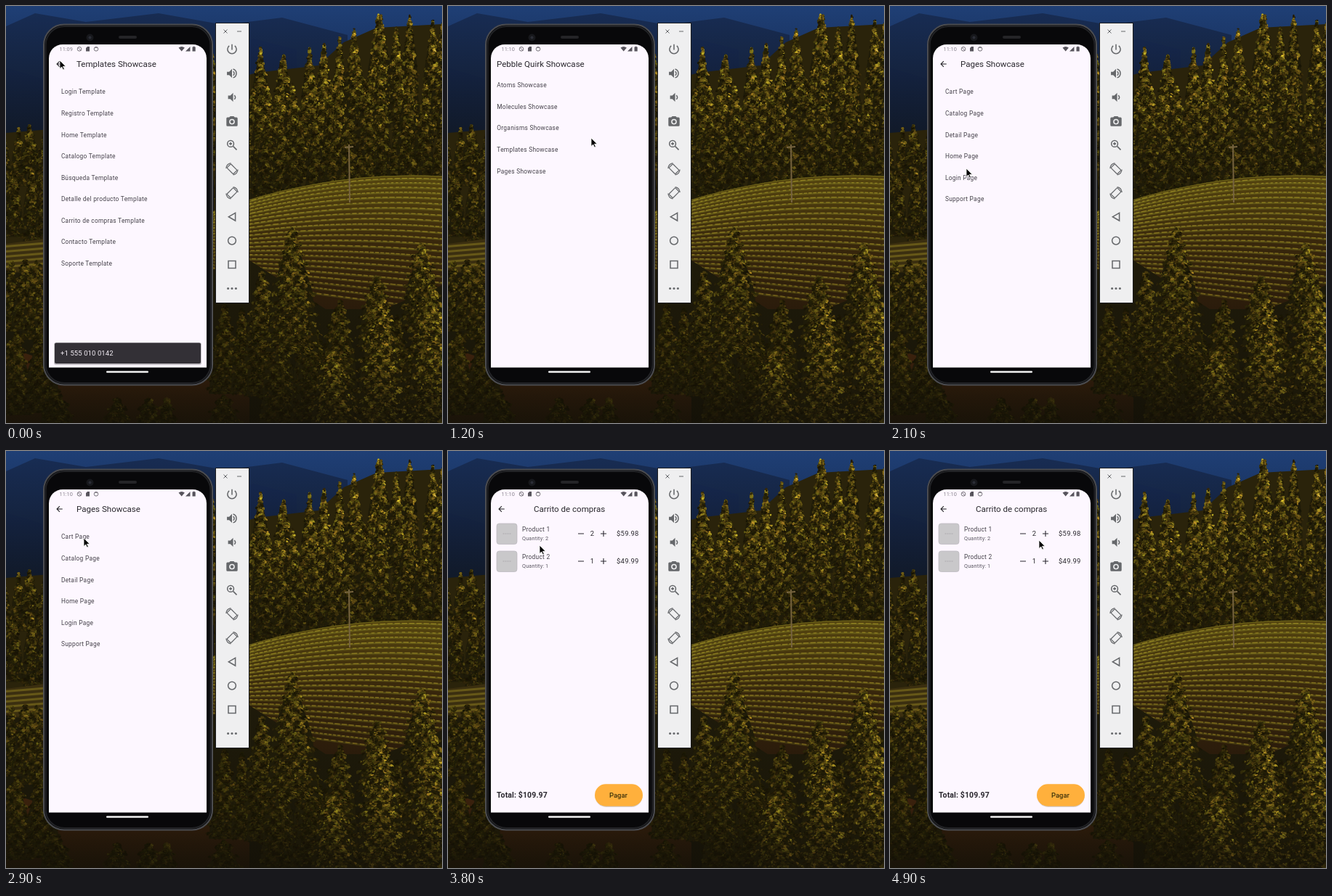
Recreate the animation shown at these times as an HTML page with a canvas. Size 600 px wide and 575 px high, loop 5000 ms.

```html
<!DOCTYPE html>
<html lang="es">
<head>
<meta charset="utf-8">
<title>Showcase demo</title>
<style>
html, body { margin: 0; width: 100%; height: 100%; overflow: hidden; background: #111; }
canvas, svg { position: absolute; left: 0; top: 0; display: block; }
text { font-family: Roboto, sans-serif; fill: #2a282e; white-space: pre; }
.title { font-size: 11.55px; }
.item { font-size: 8.4px; letter-spacing: .2625px; fill: #45424a; }
.sub { font-size: 7.35px; letter-spacing: .13px; fill: #5c5862; }
.price { font-size: 9.45px; letter-spacing: .26px; }
.total { font-size: 10.5px; letter-spacing: .13px; font-weight: 700; }
.toast { font-size: 9.45px; letter-spacing: .13px; fill: #f5eff7; }
.pay { font-size: 9.45px; font-weight: 500; fill: #40340c; }
.clock { font-size: 7.35px; fill: #85818a; }
.line { fill: none; stroke: #66686b; stroke-width: 2; }
.solid { fill: #66686b; }
</style>
</head>
<body>
<canvas id="scenery" width="600" height="575"></canvas>
<svg id="stage" width="600" height="575" viewBox="0 0 600 575"></svg>
<script>
// ---------- landscape ----------
const ctx = document.getElementById('scenery').getContext('2d');
let seed = 11;
const rand = () => (seed = (seed * 16807) % 2147483647) / 2147483647;
const between = (a, b) => a + (b - a) * rand();

function shape(color, ...points) {
  ctx.fillStyle = color;
  ctx.beginPath();
  points.forEach(([x, y]) => ctx.lineTo(x, y));
  ctx.fill();
}

function fade(y0, y1, ...colors) {
  const g = ctx.createLinearGradient(0, y0, 0, y1);
  colors.forEach((c, i) => g.addColorStop(i / (colors.length - 1), c));
  return g;
}

// Leaf dabs over a dark silhouette, with lit clumps; a lower taper makes a rounder crown
function tree(x, top, base, width, light, taper = .75) {
  const h = base - top;
  shape('#1f1b09', [x, top], [x + width * .3, top + h * .5], [x + width * .4, base],
    [x - width * .4, base], [x - width * .3, top + h * .5]);
  for (let i = h * width / 7; i > 0; i--) {
    const u = rand() ** .8, side = between(-1, 1);
    const reach = width / 2 * u ** taper * (.75 + .25 * Math.sin(u * h * .45 + x));
    const px = x + side * reach, py = top + u * h;
    const clump = .55 + .45 * Math.sin(px * .34 + x) * Math.sin(py * .3 + x);
    const lum = 5 + light * rand() * clump * (1 + side * .25) * (1.2 - u * .6);
    ctx.fillStyle = `hsl(${between(41, 55)} 66% ${lum}%)`;
    ctx.beginPath();
    ctx.ellipse(px, py, between(.8, 2.6), between(.7, 1.7), side * .6, 0, 7);
    ctx.fill();
  }
}

function forest(x0, x1, count, topAt, height, width, light, taper) {
  for (let i = 0; i < count; i++) {
    const x = x0 + (x1 - x0) * (i + rand()) / count, top = topAt(x) + between(-13, 13);
    tree(x, top, top + height * between(.8, 1.2), width * between(.75, 1.25), light, taper);
  }
}

function vineyard() {
  ctx.save();
  ctx.beginPath();
  ctx.moveTo(280, 285);
  ctx.quadraticCurveTo(450, 222, 620, 236);
  ctx.lineTo(620, 460);
  ctx.lineTo(280, 400);
  ctx.clip();
  ctx.fillStyle = fade(235, 420, '#54440f', '#38270c', '#2a1b0b');
  ctx.fillRect(280, 220, 340, 250);
  for (let k = 0; k < 24; k++) {
    const s = (k / 23) ** 1.15;
    for (const [shift, lum, weight] of [[0, 25, 2.4], [-.8, 36, 1.2]]) {
      ctx.strokeStyle = `hsl(${52 - s * 5} 62% ${lum - s * 9}%)`;
      ctx.lineWidth = weight + s * .6;
      ctx.setLineDash(shift ? [between(3, 8), between(2, 4)] : []);
      ctx.beginPath();
      ctx.moveTo(280, 285 + s * 90 + shift);
      ctx.quadraticCurveTo(450, 222 + s * 180 + shift, 620, 236 + s * 185 + shift);
      ctx.stroke();
    }
  }
  ctx.restore();
}

function landscape() {
  shape(fade(0, 200, '#1f3f75', '#172e58', '#131f36'), [0, 0], [600, 0], [600, 575], [0, 575]);
  shape(fade(0, 170, '#182d55', '#121b2c'), [0, 28], [40, 10], [110, 22], [210, 10], [300, 26],
    [380, 16], [470, 40], [470, 200], [0, 200]);
  shape(fade(50, 170, '#15264a', '#111a2a'), [0, 85], [50, 100], [280, 75], [340, 45], [400, 60],
    [400, 200], [0, 200]);

  // Hillside forest, back to front
  shape('#2a230b', [280, 110], [345, 92], [430, 82], [465, 50], [510, 30], [600, 25], [600, 575], [0, 575],
    [0, 175], [60, 170]);
  const skyline = x => 24 + 52 / (1 + Math.exp((x - 455) / 18));
  forest(284, 610, 17, x => skyline(x) - 8, 125, 38, 44);
  forest(284, 610, 17, x => skyline(x) + 38, 115, 40, 42);
  forest(284, 610, 17, x => skyline(x) * .4 + 90, 100, 38, 34);
  forest(284, 610, 18, () => 152, 95, 36, 27);
  forest(284, 610, 18, () => 196, 75, 34, 21);
  forest(-5, 62, 4, () => 172, 80, 32, 32);
  forest(-5, 62, 5, () => 230, 95, 34, 28);
  vineyard();

  shape('#3b2f10', [0, 328], [60, 320], [60, 362], [0, 368]);
  for (let y = 330; y < 364; y += 7) shape('#665818', [0, y], [60, y - 5], [60, y - 2], [0, y + 3]);

  shape('#75623f', [471, 191], [473, 191], [474, 271], [472, 271]);
  shape('#75623f', [466, 194], [478, 193], [478, 195], [466, 196]);

  // Foreground: shaded slope with bare soil, then the sunlit crowns
  shape(fade(360, 575, '#1e1a0a', '#171408'), [0, 368], [280, 365], [334, 350], [440, 418], [520, 418],
    [600, 385], [600, 575], [0, 575]);
  forest(-5, 60, 4, () => 362, 110, 46, 28, .5);
  shape(fade(480, 575, '#3a210d', '#22170a'), [0, 470], [60, 490], [260, 495], [335, 540], [335, 575], [0, 575]);
  forest(-10, 60, 3, () => 450, 110, 56, 18, .5);
  forest(40, 340, 5, () => 540, 70, 60, 13, .5);
  forest(285, 350, 3, () => 405, 140, 50, 18, .6);
  forest(340, 600, 7, () => 430, 140, 64, 18, .6);
  tree(352, 365, 490, 60, 27, .6);
  tree(572, 328, 450, 70, 38, .5);
  tree(394, 306, 480, 92, 34, .6);
  tree(510, 372, 470, 64, 32, .5);
  tree(460, 405, 560, 66, 24, .6);
  tree(515, 400, 590, 88, 40, .5);
  tree(586, 385, 590, 90, 42, .5);
  tree(450, 475, 600, 84, 34, .5);
  shape(fade(490, 575, '#120f0700', '#120f0788'), [0, 490], [600, 490], [600, 575], [0, 575]);
}
landscape();

// ---------- phone and emulator panel ----------
const text = (cls, x, y, s, extra = '') => `<text class="${cls}" x="${x}" y="${y}" ${extra}>${s}</text>`;
const rect = (x, y, w, h, fill, extra = '') =>
  `<rect x="${x}" y="${y}" width="${w}" height="${h}" fill="${fill}" ${extra}/>`;
const line = (d, extra = '') => `<path class="line" d="${d}" ${extra}/>`;
const solid = d => `<path class="solid" d="${d}"/>`;
const group = (id, content) => `<g id="${id}">${content}</g>`;
const icon = (x, y, scale, content) =>
  `<g transform="translate(${x} ${y}) scale(${scale}) translate(-12 -12)">${content}</g>`;
const rows = (x, y, names) => names.map((s, i) => text('item', x, y + i * 29.55, s)).join('');

const speaker = x => solid(`M${x} 9v6h4l5 5V4l-5 5z`);
const device = '<rect class="line" x="7" y="4" width="10" height="16" rx="1" transform="rotate(-45 12 12)" style="stroke-width:1.6"/>' +
  line('M1.500 11A10.500 10.500 0 0 1 10 1.500M22.500 13A10.500 10.500 0 0 1 14 22.500', 'style="stroke-width:1.600"');
const panelIcons = [
  line('M12 2.5v10M7 5.3a8 8 0 1 0 10 0'),
  speaker(3) + line('M14 8.5a4 4 0 0 1 0 7M14 4.3a8 8 0 0 1 0 15.4'),
  speaker(5) + line('M16 8.5a4 4 0 0 1 0 7'),
  solid('M4 5h3l2-2h6l2 2h3a2 2 0 0 1 2 2v12a2 2 0 0 1-2 2H4a2 2 0 0 1-2-2V7a2 2 0 0 1 2-2z') +
    '<circle cx="12" cy="13" r="4" fill="#66686b" stroke="#efeff0" stroke-width="2"/>',
  '<circle class="line" cx="9.5" cy="9.5" r="5.7"/>' + line('M14 14l6.5 6.5M9.5 7v5M7 9.5h5'),
  device,
  `<g transform="matrix(-1 0 0 1 24 0)">${device}</g>`,
  line('M18 5v14L6 12z'),
  '<circle class="line" cx="12" cy="12" r="7"/>',
  line('M5.5 5.5h13v13h-13z'),
  '<g class="solid"><circle cx="5" cy="12" r="2"/><circle cx="12" cy="12" r="2"/><circle cx="19" cy="12" r="2"/></g>'
];
const panel = rect(288.5, 23.5, 46, 386, '#efeff0', 'stroke="#1b1c1e"') +
  line('M299.5 32.5l5 5m0-5l-5 5M318 35h6', 'style="stroke-width:1"') +
  panelIcons.map((s, i) => icon(311, 60 + i * 32.95, .77, s)).join('');

const phone = rect(283, 240, 3, 42, '#151517', 'rx="1"') +
  rect(52, 25.5, 232, 497, '#08080a', 'rx="28" stroke="#4b4c50" stroke-width="2"') +
  rect(54.5, 28, 227, 492, 'none', 'rx="26" stroke="#222326" stroke-width="2"') +
  '<circle cx="115.5" cy="43.5" r="5" fill="#17181c"/><circle cx="115.5" cy="43.5" r="2" fill="#2b2d36"/>' +
  rect(155, 41, 25, 4, '#242427', 'rx="2"') +
  '<path fill="#fdf7ff" d="M59 498.400V72a19 19 0 0 1 19-19h179a19 19 0 0 1 19 19v426.400z"/>' +
  rect(138, 503.3, 58, 2.5, '#f2f2f2', 'rx="1.2"');

const status = text('clock', 73.5, 62.3, '', 'id="clock"') +
  '<g fill="none" stroke="#77737b"><circle cx="101" cy="59.3" r="2.8"/><path d="M99 57.3l4 4"/>' +
  '<circle cx="124" cy="59.3" r="2.8"/><path d="M122 57.3h4"/></g>' +
  '<g fill="#57545c"><path d="M110 58l2-2h3v6.5h-5z"/><path d="M237.5 57.5q4.2-3 8.4 0l-4.2 5z"/>' +
  '<path d="M253.5 56v6.5h-6.5z"/><path d="M256.5 56.5h1.2v-.8h1.8v.8h1.2v6h-4.2z"/></g>';

const backArrow = icon(73.5, 80, .525,
  '<path fill="#1d1b20" d="M20 11H7.8l5.6-5.6L12 4l-8 8 8 8 1.4-1.4L7.8 13H20z"/>');

const product = (n, y, quantity, price) =>
  rect(67, y - 14, 28, 28.5, '#c9c8ca', 'rx="3.5" stroke="#b9b7bc" stroke-width=".7"') +
  line(`M75.5 ${y}h11`, 'style="stroke:#aaa8ad;stroke-width:1;stroke-dasharray:2 1"') +
  text('item', 102, y - 3, 'Product ' + n) +
  text('sub', 102, y + 9, 'Quantity: ' + quantity) +
  line(`M179 ${y}h8M210 ${y}h8M214 ${y - 4}v8`, 'style="stroke:#2b2930;stroke-width:1.1"') +
  text('price', 195.8, y + 3.4, quantity) +
  text('price', 232, y + 3.4, price);

const screens = {
  templates: backArrow + text('title', 97, 84, 'Templates Showcase') +
    rows(75.9, 121.4, ['Login', 'Registro', 'Home', 'Catalogo', 'Búsqueda', 'Detalle del producto',
      'Carrito de compras', 'Contacto', 'Soporte'].map(s => s + ' Template')),
  home: rect(59, 183, 217, 30, '#ebe8ec', 'id="highlight"') + text('title', 67, 83.8, 'Pebble Quirk Showcase') +
    rows(67.3, 112.3, ['Atoms', 'Molecules', 'Organisms', 'Templates', 'Pages'].map(s => s + ' Showcase')),
  pages: backArrow + text('title', 97, 84, 'Pages Showcase') +
    rows(75.9, 121.4, ['Cart', 'Catalog', 'Detail', 'Home', 'Login', 'Support'].map(s => s + ' Page')),
  cart: backArrow + text('title', 118, 84, 'Carrito de compras') +
    product(1, 114, 2, '$59.98') + product(2, 152, 1, '$49.99') +
    text('total', 67, 478, 'Total: $109.97') +
    rect(202.5, 460.5, 65, 30.5, '#8a7a66', 'rx="15" opacity=".35"') +
    rect(202, 459.3, 66, 30.5, '#ffb03c', 'rx="15.2"') + text('pay', 222, 478, 'Pagar')
};

const toast = rect(66, 464, 203, 31, '#000', 'rx="3" opacity=".22"') +
  rect(67, 464.5, 201, 28.5, '#333036', 'rx="2"') + text('toast', 75, 482, '+1 555 010 0142');

document.getElementById('stage').innerHTML = phone + panel + status +
  Object.entries(screens).map(([id, content]) => group(id, content)).join('') +
  group('toast', toast) +
  group('cursor', '<path d="M0 0v11.5l2.7-2.5 1.9 4 1.8-.8-1.9-3.900h3.700z" fill="#000" stroke="#fff" stroke-width=".8"/>');

// ---------- motion ----------
const LOOP = 5000, STEP = 100;
const pointer = [
  [0, 74, 75], [200, 75, 76], [600, 96, 96], [1200, 197, 182], [1500, 105, 224], [2200, 105, 224],
  [2700, 107, 120], [3100, 107, 120], [3600, 120, 127], [3800, 126, 130], [4000, 126, 130],
  [4500, 187, 151], [4900, 205, 123]
];
const el = id => document.getElementById(id);
const show = (id, on) => el(id).setAttribute('visibility', on ? 'inherit' : 'hidden');

function pointerAt(t) {
  const i = pointer.findIndex(p => p[0] >= t), b = pointer[i], a = pointer[Math.max(0, i - 1)];
  const u = a === b ? 0 : (t - a[0]) / (b[0] - a[0]), ease = u * u * (3 - 2 * u);
  return [1, 2].map(k => a[k] + (b[k] - a[k]) * ease);
}

function draw() {
  const t = Math.floor(performance.now() % LOOP / STEP) * STEP;
  const current = t < 200 ? 'templates' : t < 1700 ? 'home' : t < 3200 ? 'pages' : 'cart';
  for (const id in screens) show(id, id === current);
  show('toast', t < 900);
  show('highlight', current === 'home' && t < 900);
  el('clock').textContent = t < 1000 ? '11:09' : '11:10';
  el('cursor').setAttribute('transform', `translate(${pointerAt(t)})`);
  requestAnimationFrame(draw);
}
draw();
</script>
</body>
</html>
```
